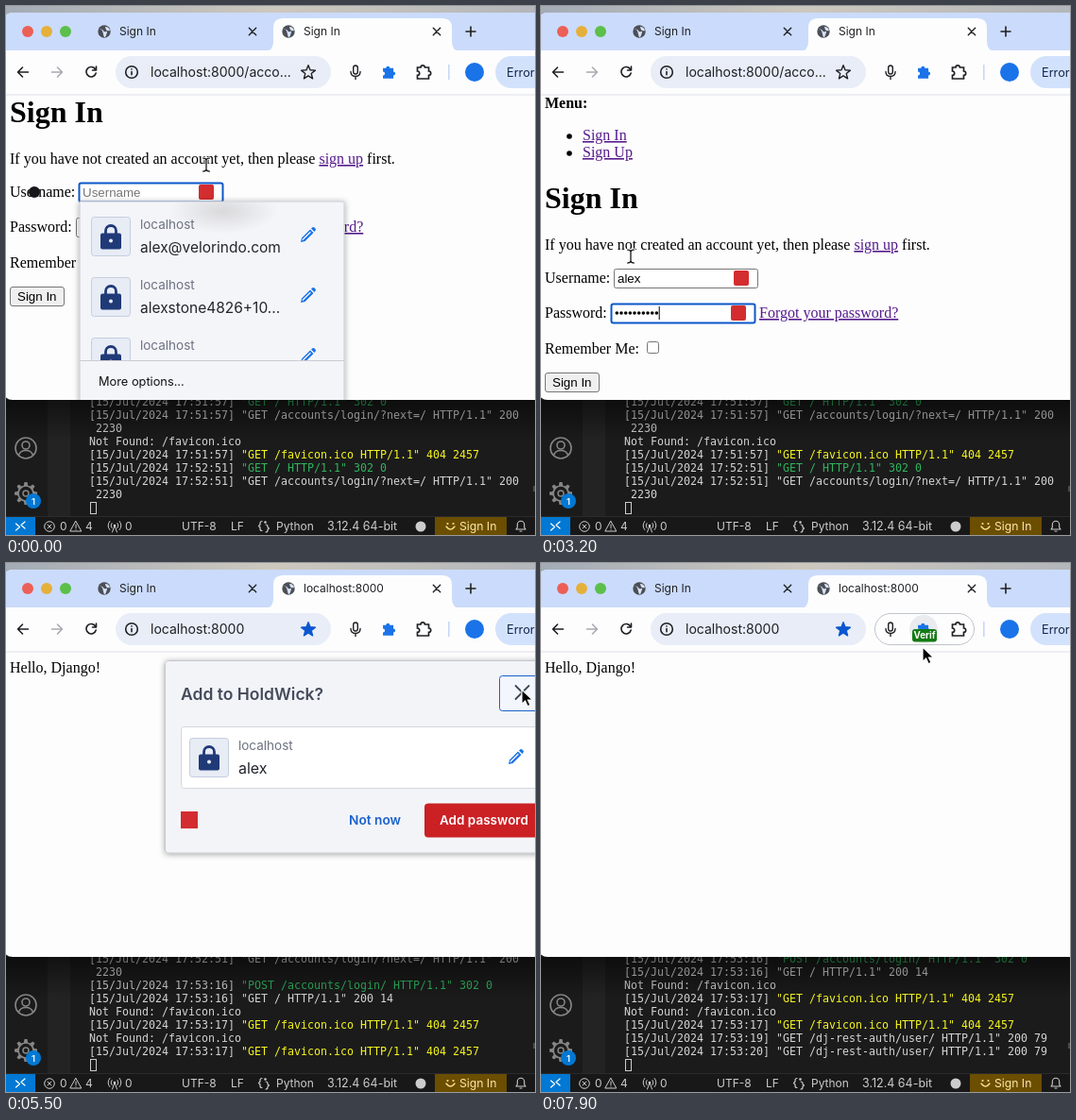
Animation of 560x560 px, one loop 8 s. Source, as an HTML page:

```html
<!DOCTYPE html>
<html lang="en">
<head>
<meta charset="utf-8">
<title>Sign in demo</title>
<style>
  html, body { margin: 0; width: 100%; height: 100%; overflow: hidden; background: #1b1b1b; }
  svg { display: block; width: 100vw; height: 100vh; }
  text { white-space: pre; }
  .ui { font-family: Inter, Roboto, sans-serif; }
  .page { font: 16px "Liberation Serif", serif; }
  .field { font: 13.33px "Liberation Sans", sans-serif; }
  .mono { font: 11.63px "DejaVu Sans Mono", monospace; }
  .link { fill: #551a8b; text-decoration: underline; }
  .line { fill: none; stroke-linecap: round; stroke-linejoin: round; }
</style>
</head>
<body>
<svg id="stage" viewBox="0 0 560 560" xmlns="http://www.w3.org/2000/svg"></svg>
<script>
const LOOP = 8000;
const ROW = 14;
const USER = "alex";
const PASSWORD_LENGTH = 10;
const INK = "#1f2023";

const text = (x, y, value, attrs = "") => `<text x="${x}" y="${y}" ${attrs}>${value}</text>`;
const rect = (x, y, w, h, attrs = "") => `<rect x="${x}" y="${y}" width="${w}" height="${h}" ${attrs}/>`;
const circle = (x, y, r, attrs = "") => `<circle cx="${x}" cy="${y}" r="${r}" ${attrs}/>`;
const stroke = (d, color = INK, width = 1.6) =>
  `<path class="line" d="${d}" stroke="${color}" stroke-width="${width}"/>`;
const at = (x, y, body) => `<g transform="translate(${x} ${y})">${body}</g>`;
const group = (id, body, attrs = "") => `<g id="${id}" ${attrs}>${body}</g>`;

const cross = (x, y, r, color, width) =>
  stroke(`M${x - r} ${y - r}l${2 * r} ${2 * r}m0 ${-2 * r}l${-2 * r} ${2 * r}`, color, width);

const globe = (x, y) => at(x, y, circle(0, 0, 6.7, 'fill="#4b4e55"') +
  '<path d="M-5-2q3-1 4 1t3 1 0 4-3-1-4-5ZM1-5q4 0 5 4-3 1-4-1T1-5Z" fill="#d7e3f8"/>');

const puzzlePath = "M-7-4h3.5a2.2 2.2 0 1 1 4.4 0H5v4a2.2 2.2 0 1 1 0 4.4V8H-7V4.4a2.2 2.2 0 1 0 0-4.4Z";

const starPath = Array.from({ length: 10 }, (_, i) => {
  const r = i % 2 ? 3.4 : 7.8;
  const a = Math.PI * (i / 5 - 0.5);
  return `${i ? "L" : "M"}${(r * Math.cos(a)).toFixed(2)} ${(r * Math.sin(a)).toFixed(2)}`;
}).join("") + "Z";

const pencil = (x, y) => at(x, y,
  '<path d="M-8 8l1-4.5L2-5.5 5.5-2-3.5 7ZM3-6.5l1.5-1.3q1-.7 2 .2l1 1q.9 1 .1 2L6.5-3Z" fill="#1a73e8"/>' +
  stroke("M-5.8 5.3L2-2.5", "#f4f5f9", 1.3));

const lockTile = (x, y) => at(x, y,
  rect(0.5, 0.5, 41, 41, 'rx="3" fill="#e7ecf5" stroke="#c5cede"') +
  stroke("M15.5 19v-4a5.5 5.5 0 0 1 11 0v4", "#203a78", 2.8) +
  rect(10, 17.5, 22, 17, 'rx="2" fill="#203a78"') + circle(21, 25.5, 2, 'fill="#e7ecf5"'));

const account = (x, y, name, size) => lockTile(x, y) +
  text(x + 52, y + 13, "localhost", 'font-size="13.5" fill="#6c7280"') +
  text(x + 52, y + 37.5, name, `font-size="${size}" fill="#22252c"`);

function desktop() {
  const gear = Array.from({ length: 8 }, (_, i) =>
    `<path d="M-2.2-8l.7-4h3l.7 4Z" fill="#868686" transform="rotate(${i * 45})"/>`).join("");
  return rect(0, 0, 560, 560, 'fill="#1b1b1b"') +
    rect(0, 0, 560, 30, 'fill="url(#wall)"') +
    rect(44, 400, 24, 141, 'fill="#232323"') +
    group("terminal", "", 'class="mono" clip-path="url(#below)"') +
    rect(89.5, 525.5, 6, 12, 'fill="none" stroke="#ccc"') +
    rect(558, 508, 2, 6, 'fill="#4a4a4a"') +
    circle(21, 468, 11, 'fill="none" stroke="#868686" stroke-width="1.6"') +
    circle(21, 465, 4, 'fill="none" stroke="#868686" stroke-width="1.6"') +
    stroke("M13.5 475.5q1.5-5 7.5-5t7.5 5", "#868686") +
    at(21, 516, gear + circle(0, 0, 8, 'fill="none" stroke="#868686" stroke-width="1.7"') +
      circle(0, 0, 3, 'fill="none" stroke="#868686" stroke-width="1.5"')) +
    circle(29, 524, 8, 'fill="#0078d4"') +
    text(29, 527.5, "1", 'class="ui" font-size="9.5" font-weight="600" fill="#fff" text-anchor="middle"') +
    rect(0, 417, 560, 44, 'fill="url(#shade)"');
}

function statusBar() {
  const color = "#cccccc";
  const labels = [[57, "0"], [84, "4"], [126, "0"], [186, "UTF-8"], [238, "LF"], [286, "Python"]];
  return rect(0, 540, 560, 20, 'fill="#181818"') + rect(0, 540, 560, 1, 'fill="#2b2b2b"') +
    rect(0, 541, 31, 19, 'fill="#0078d4"') +
    stroke("M10.5 548l4 3.5-4 3.5M20 546l-4 3.5 4 3.5", "#fff", 1.2) +
    circle(46, 551, 5.3, `fill="none" stroke="${color}"`) + cross(46, 551, 2, color, 1) +
    stroke("M74 545.5l5.8 10.5h-11.6ZM74 549v3.5m0 1.6v.2", color, 1) +
    stroke("M112.5 557l2.5-7 2.5 7M112 547.5q-2 2.5 0 5M118 547.5q2 2.5 0 5M109.8 545.5q-3.5 4.5 0 9M120.2 545.5q3.5 4.5 0 9", color, 1) +
    circle(115, 550, 1.3, `fill="${color}"`) +
    stroke("M271 545.5q-2 0-2 2v1.5l-1.5 1.5 1.5 1.5v1.5q0 2 2 2M275 549q2 0 2 2v.8l1.5 1.2-1.5 1.2v.8q0 2-2 2", color, 1.2) +
    circle(274.5, 546.5, 1.3, `fill="${color}"`) +
    labels.map(([x, s]) => text(x, 555, s, `class="ui" font-size="12" fill="${color}"`)).join("") +
    text(340, 555, "3.12.4 64-bit", `class="ui" font-size="12.5" fill="${color}"`) +
    circle(439, 551, 5.5, `fill="${color}"`) +
    rect(454, 541, 76, 19, 'fill="#6b4e00"') +
    stroke("M466 551q4.5 6 9 0", "#ffe08a", 1.4) + circle(467.5, 548, 1.1, 'fill="#ffe08a"') + circle(473.5, 548, 1.1, 'fill="#ffe08a"') +
    text(480, 555, "Sign In", 'class="ui" font-size="12.2" fill="#ffe9a8"') +
    stroke("M540 554h10l-1.3-2v-3a3.7 3.7 0 0 0-7.4 0v3ZM544 556h2", color, 1.1);
}

function input(id, x, y, iconX) {
  return rect(x + 0.5, y + 0.5, 152, 20, `id="${id}" rx="2" fill="#fff"`) +
    rect(iconX, y + 2, 16, 16, 'rx="2" fill="#d32d2f"');
}

function signInPage() {
  return text(4, 108, "Menu:", 'font-weight="700"') +
    circle(30, 138, 2.8) + circle(30, 156, 2.8) +
    text(44, 142, "Sign In", 'class="link"') + text(44, 160, "Sign Up", 'class="link"') +
    text(4, 214, "Sign In", 'font-size="32" font-weight="700"') +
    text(4, 258, 'If you have not created an account yet, then please <tspan class="link">sign up</tspan> first.') +
    text(4, 293, "Username:") + input("userBox", 77, 278, 204) +
    text(81, 293, "", 'id="user" class="field"') +
    text(4, 330, "Password:") + input("passBox", 74, 315, 201) + group("dots", "") +
    text(231, 330, "Forgot your password?", 'class="link"') +
    text(4, 368, "Remember Me:") +
    rect(112.5, 355.5, 12, 12, 'rx="2" fill="#fff" stroke="#767676"') +
    rect(4.5, 388.5, 57, 20, 'id="button" rx="2.5" stroke="#767676"') +
    text(12, 403, "Sign In", 'class="field"');
}

function dropdown() {
  const names = ["alex@velorindo.com", "alexstone4826+10...", ""];
  return rect(78, 207, 280, 240, 'fill="#f4f5f9" stroke="#c9ccd2" filter="url(#soft)"') +
    '<ellipse cx="230" cy="217" rx="58" ry="24" fill="url(#smudge)" clip-path="url(#list)"/>' +
    `<g clip-path="url(#list)">${names.map((name, i) =>
      account(90, 223 + 64 * i, name, 15.5) + pencil(320, 242 + 64 * i)).join("")}</g>` +
    rect(78, 375, 280, 1, 'fill="#c9ccd2"') +
    text(98, 402, "More options...", 'font-size="12.8" fill="#111"');
}

function savePrompt() {
  return rect(168.5, 103.5, 420, 203.5, 'rx="3" fill="#f3f4f8" stroke="#c4c7cd" filter="url(#soft)"') +
    text(185, 144.5, "Add to HoldWick?", 'font-size="17.5" font-weight="600" fill="#444b5b"') +
    rect(522.5, 119.5, 60, 37, 'id="closeFocus" rx="3" fill="#f3f6fc" stroke="#1a62c8"') +
    cross(546.5, 137, 7, "#3f4654", 1.8) +
    rect(185.5, 173.5, 400, 65, 'rx="3" fill="#fff" stroke="#d3d6dc"') +
    account(194, 185, USER, 16) + pencil(540, 205) +
    rect(185, 263, 18, 18, 'fill="#d32d2f"') +
    text(363, 277, "Not now", 'font-size="13.7" font-weight="600" fill="#1b62cc"') +
    rect(443, 254.5, 140, 36, 'rx="4" fill="#cb2024"') +
    text(459, 277, "Add password", 'font-size="13.5" font-weight="600" fill="#fff"');
}

function browserChrome() {
  const lights = ["#ec5f56", "#e5b03a", "#5bbf4a"];
  const label = 'class="ui" font-size="12" fill="#1f2023"';
  return rect(0, 7, 560, 50, 'fill="#cbdbfb"') +
    lights.map((c, i) => circle(23 + 20 * i, 27, 6, `fill="${c}"`)).join("") +
    globe(104, 27) + text(120, 31.3, "Sign In", label) + cross(261, 27, 3.7, INK, 1.4) +
    '<path d="M273 48q10 0 10-10V23q0-10 10-10h169q10 0 10 10v15q0 10 10 10Z" fill="#fdfdfe"/>' +
    globe(299, 27) + text(315, 31.3, "", `id="tab" ${label}`) + cross(456, 27, 3.7, INK, 1.4) +
    stroke("M487 27h10M492 22v10") +
    rect(0, 47, 560, 47, 'fill="#fdfdfe"') + rect(0, 93.5, 560, 1, 'fill="#dde2ea"') +
    stroke("M23.5 70h-11m5-5l-5 5 5 5") + stroke("M48.5 70h11m-5-5l5 5-5 5", "#a9abb0") +
    stroke("M94.6 67a5.2 5.2 0 1 0 .6 4M95.5 64v4h-4") +
    rect(116, 53, 228, 34, 'rx="17" fill="#e8edf8"') +
    circle(133, 70, 6.3, 'fill="none" stroke="#1f2023" stroke-width="1.6"') + stroke("M133 69.5v3.3M133 66.8v.2") +
    text(153, 75, "", 'id="url" class="ui" font-size="14.05" fill="#1f2023"') +
    at(320, 70.5, `<path id="star" d="${starPath}" stroke-width="1.4" stroke-linejoin="round"/>`) +
    rect(353.5, 53.5, 105, 33, 'id="pill" rx="16.5" fill="none" stroke="#bfc3ca"') +
    circle(405, 70, 15, 'id="hover" fill="#e9ebef"') +
    rect(367.7, 63, 4.6, 9, 'rx="2.3" fill="none" stroke="#1f2023" stroke-width="1.4"') +
    stroke("M365 69.5q0 5 5 5t5-5M370 74.5v3", INK, 1.4) +
    at(405.5, 69.5, `<path d="${puzzlePath}" fill="#1a73e8" transform="scale(.92)"/>`) +
    at(442.5, 69, `<path d="${puzzlePath}" fill="none" stroke="${INK}" stroke-width="1.7"/>`) +
    group("badge", rect(393, 70, 26, 13.5, 'rx="3" fill="#137a13"') +
      text(406, 80.3, "Verif", 'class="ui" font-size="9.8" font-weight="700" fill="#fff" text-anchor="middle"')) +
    rect(468, 62, 1.6, 16, 'fill="#c7d8f8"') +
    circle(496, 70, 10, 'fill="#1a73e8"') +
    rect(518, 53, 70, 34, 'rx="17" fill="#d3e2fc"') +
    text(530, 74.7, "Error", 'class="ui" font-size="12.7" fill="#10264f"');
}

const beam = "M-3.5-7q3 0 3.5 2 .5-2 3.5-2M0-5V5M-3.5 7q3 0 3.5-2 .5 2 3.5 2";
const stage = document.getElementById("stage");
stage.innerHTML = `<defs>
  <linearGradient id="wall"><stop stop-color="#a3abb5"/><stop offset=".5" stop-color="#cdc8be"/><stop offset="1" stop-color="#b3b6ba"/></linearGradient>
  <linearGradient id="shade" x2="0" y2="1"><stop stop-color="#000" stop-opacity=".5"/><stop offset="1" stop-color="#000" stop-opacity="0"/></linearGradient>
  <radialGradient id="smudge"><stop stop-color="#d9d9db"/><stop offset="1" stop-color="#d9d9db" stop-opacity="0"/></radialGradient>
  <filter id="soft" x="-10%" y="-10%" width="120%" height="120%"><feDropShadow dx="0" dy="1" stdDeviation="3" flood-opacity=".35"/></filter>
  <clipPath id="window">${rect(-4, 7, 580, 410, 'rx="11"')}</clipPath>
  <clipPath id="view">${rect(0, 94, 560, 323)}</clipPath>
  <clipPath id="list">${rect(78, 207, 280, 168)}</clipPath>
  <clipPath id="below">${rect(68, 410, 492, 130)}</clipPath>
</defs>` + desktop() + statusBar() +
  `<g clip-path="url(#window)">${rect(0, 7, 560, 410, 'fill="#fdfdfe"')}
    <g clip-path="url(#view)">
      ${group("login", signInPage(), 'class="page"')}
      ${text(4, 116, "Hello, Django!", 'id="hello" class="page"')}
      ${circle(30, 197, 6, 'id="spot" fill="#15171b"')}
      ${group("dropdown", dropdown(), 'class="ui"')}
      ${group("prompt", savePrompt(), 'class="ui"')}
    </g>${browserChrome()}</g>` +
  group("ibeam", stroke(beam, "#fff", 3) + stroke(beam, "#000", 1.2)) +
  group("arrow", '<path d="M0 0v15.5l3.6-3.4 2.6 5.6 2.9-1.3-2.6-5.4h5Z" stroke="#fff" stroke-width="1.2"/>');

const el = Object.fromEntries([...stage.querySelectorAll("[id]")].map(node => [node.id, node]));
const show = (node, on) => node.setAttribute("display", on ? "inline" : "none");
const move = (node, x, y) => node.setAttribute("transform", `translate(${x} ${y})`);
const clamp = (v, lo = 0, hi = 1) => Math.min(hi, Math.max(lo, v));
const setText = (node, value) => { if (node.textContent !== value) node.textContent = value; };

// Each entry: time it appears, clock, request, response
const nextPage = "GET /accounts/login/?next=/";
const log = [
  [0, "17:51:57", "GET /", "302 0"],
  [0, "17:51:57", nextPage, "200"], [0, " 2230"],
  [0, "Not Found: /favicon.ico"],
  [0, "17:51:57", "GET /favicon.ico", "404 2457"],
  [0, "17:52:51", "GET /", "302 0"],
  [0, "17:52:51", nextPage, "200"], [0, " 2230"],
  [4000, "17:53:16", "POST /accounts/login/", "302 0"],
  [4000, "17:53:16", "GET /", "200 14"],
  [4200, "Not Found: /favicon.ico"],
  [4200, "17:53:17", "GET /favicon.ico", "404 2457"],
  [4300, "Not Found: /favicon.ico"],
  [4300, "17:53:17", "GET /favicon.ico", "404 2457"],
  [6500, "17:53:19", "GET /dj-rest-auth/user/", "200 79"],
  [7300, "17:53:20", "GET /dj-rest-auth/user/", "200 79"],
];
const statusColors = { 2: "#d4d4d4", 3: "#2fb45f", 4: "#f5f51e" };
let shownRows = -1;

function drawLog(t) {
  const rows = log.filter(([start]) => start <= t);
  if (rows.length === shownRows) return;
  shownRows = rows.length;
  el.terminal.innerHTML = rows.slice(-8).map(([, clock, request, response], i) => {
    const line = response
      ? `[15/Jul/2024 ${clock}] <tspan fill="${statusColors[response[0]]}">"${request} HTTP/1.1" ${response}</tspan>`
      : clock;
    return text(88, 423 + ROW * i, line, 'fill="#d4d4d4"');
  }).join("");
}

// Pointer stops: time, x, y
const pointer = [
  [0, 212, 168], [2900, 150, 235], [3200, 95, 265], [3550, 33, 398], [3900, 33, 398],
  [4400, 333, 148], [4800, 389, 93], [5250, 546, 134], [5500, 546, 134],
  [5850, 404, 69], [6800, 404, 69], [7300, 404, 89], [LOOP, 404, 89],
];

function pointerAt(t) {
  if (t < 2900) return pointer[0].slice(1);
  const i = pointer.findIndex(([time]) => time > t);
  const [t0, x0, y0] = pointer[i - 1];
  const [t1, x1, y1] = pointer[i];
  const p = (t - t0) / (t1 - t0);
  const e = p * p * (3 - 2 * p);
  return [x0 + (x1 - x0) * e, y0 + (y1 - y0) * e];
}

function focusBox(node, focused) {
  node.setAttribute("stroke", focused ? "#0b57c9" : "#767676");
  node.setAttribute("stroke-width", focused ? 2 : 1);
}

function drawLogin(t) {
  const listOpen = t < 500;
  const inPassword = t >= 1200;
  const typed = clamp(Math.floor((t - 450) / 150), 0, USER.length);
  const bullets = clamp(Math.floor((t - 1250) / 160), 0, PASSWORD_LENGTH);
  move(el.login, 0, listOpen ? -91 : 0);
  show(el.dropdown, listOpen);
  show(el.spot, t < 300);
  setText(el.user, typed ? USER.slice(0, typed) : "Username");
  el.user.setAttribute("fill", typed ? "#000" : "#757575");
  focusBox(el.userBox, !inPassword);
  focusBox(el.passBox, inPassword);
  el.button.setAttribute("fill", t > 3700 ? "#dcdcdc" : "#efefef");
  const step = 4.67;
  el.dots.innerHTML = Array.from({ length: bullets }, (_, i) =>
    circle(78 + step * (i + 0.5), 325, 1.8)).join("") +
    (inPassword ? rect(78 + step * bullets, 318, 1, 14) : "");
}

function render(t) {
  const signedIn = t >= 4000;
  show(el.login, !signedIn);
  show(el.hello, signedIn);
  if (signedIn) {
    show(el.dropdown, false);
    show(el.spot, false);
  } else {
    drawLogin(t);
  }
  setText(el.tab, signedIn ? "localhost:8000" : "Sign In");
  setText(el.url, signedIn ? "localhost:8000" : "localhost:8000/acco...");
  el.star.setAttribute("fill", signedIn ? "#0b57d0" : "none");
  el.star.setAttribute("stroke", signedIn ? "#0b57d0" : INK);

  const enter = (1 - clamp((t - 4250) / 380)) ** 2;
  const leave = clamp((t - 5810) / 365) ** 2;
  show(el.prompt, t > 4250 && t < 6175);
  move(el.prompt, 0, -213 * (enter + leave));
  show(el.closeFocus, t >= 5250);

  show(el.pill, t >= 5700);
  show(el.hover, t >= 5800);
  show(el.badge, t >= 6500);
  drawLog(t);

  const [x, y] = pointerAt(t);
  const overText = t < 3420;
  show(el.ibeam, overText && (t < 500 || t >= 2900));
  show(el.arrow, !overText);
  move(overText ? el.ibeam : el.arrow, x, y);
}

function tick(now) {
  render(now % LOOP);
  requestAnimationFrame(tick);
}
render(0);
requestAnimationFrame(tick);
</script>
</body>
</html>
```
